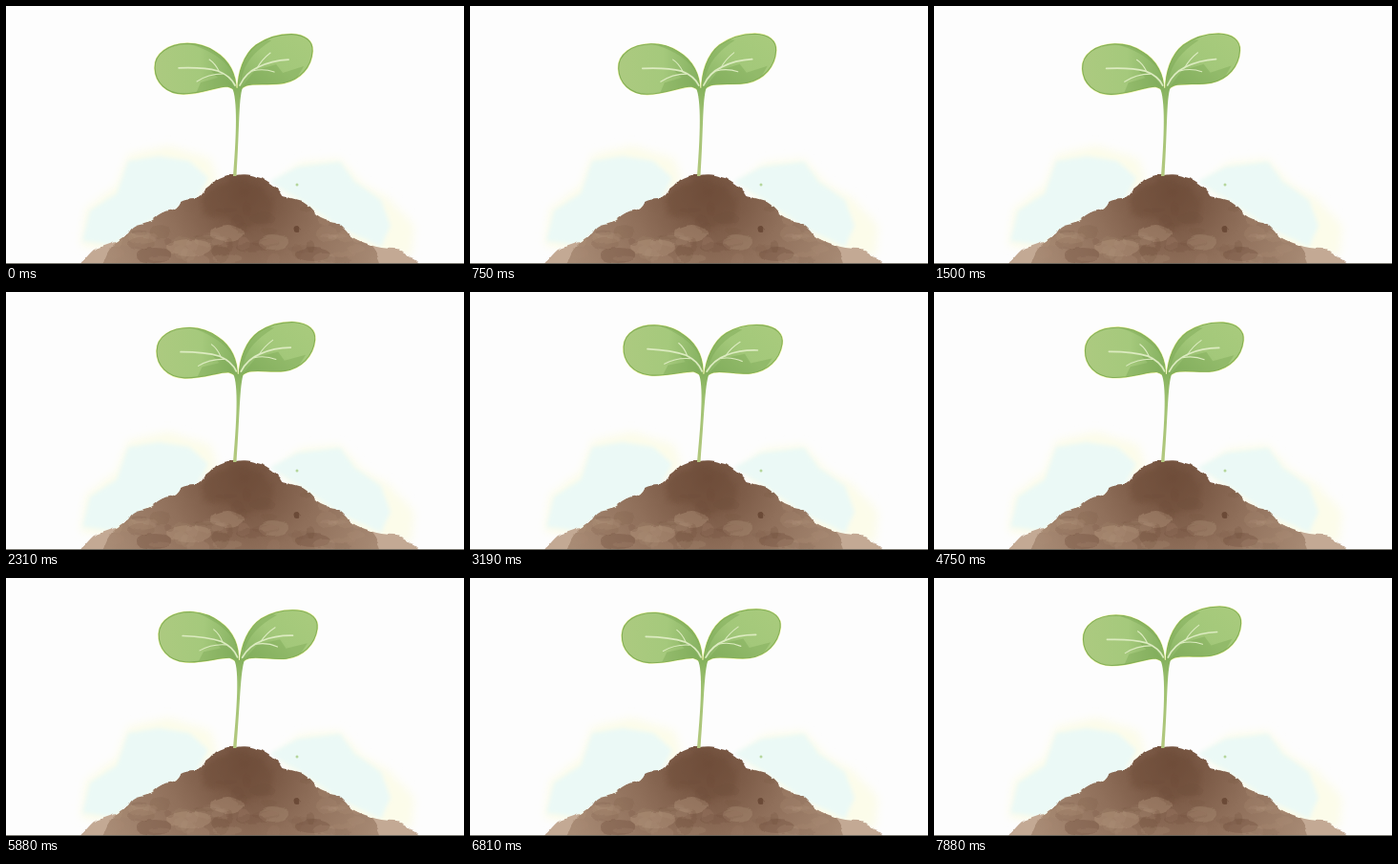
An HTML page that plays this animation: 480x270 px, repeating every 7.95 s.

```html
<!DOCTYPE html>
<html lang="en">
<head>
<meta charset="utf-8">
<title>Swaying sprout</title>
<style>
  html, body { margin: 0; width: 100%; height: 100%; overflow: hidden; background: #fdfdfd; }
  svg { position: absolute; left: 0; top: 0; width: 480px; height: 270px; }
</style>
</head>
<body>
<svg viewBox="0 0 480 270">
  <defs>
    <filter id="rough" x="-5%" y="-5%" width="110%" height="110%" color-interpolation-filters="sRGB">
      <feTurbulence type="fractalNoise" baseFrequency=".08" numOctaves="2" seed="4"/>
      <feDisplacementMap in="SourceGraphic" scale="5" xChannelSelector="R" yChannelSelector="G"/>
    </filter>
    <filter id="soft" x="-20%" y="-20%" width="140%" height="140%"><feGaussianBlur stdDeviation="5"/></filter>
    <filter id="bleed" x="-20%" y="-20%" width="140%" height="140%"><feGaussianBlur stdDeviation="2"/></filter>
    <radialGradient id="earth" gradientUnits="userSpaceOnUse" cx="250" cy="194" r="160">
      <stop offset="0" stop-color="#71503d"/><stop offset=".25" stop-color="#7d5c48"/>
      <stop offset=".5" stop-color="#8f6f5a"/><stop offset="1" stop-color="#a88b75"/>
    </radialGradient>
    <clipPath id="inSoil"><path id="mound" d="M100 276Q105 256 113 250Q120 243 128 238Q133 229 141 228Q149 227 154 223Q164 214 172 214Q180 212 183 205Q188 202 197 202Q205 199 208 192Q214 188 219 182Q228 176 241 177Q254 175 262 179Q271 181 275 184Q284 188 290 199Q300 201 310 204Q318 209 326 219Q334 225 345 226Q354 231 360 240Q370 247 382 250Q390 258 394 276Z"/></clipPath>
  </defs>
  <!-- pale washes behind the mound -->
  <path filter="url(#soft)" fill="#fcfcea" d="M78 250L84 212 116 188 128 156 170 146 215 160 222 185 120 260ZM282 186L308 164 350 160 372 185 402 202 428 230 425 262 370 262Z"/>
  <path filter="url(#bleed)" fill="#ebf9f6" d="M80 246L88 214 116 196 128 162 160 157 192 162 212 180 200 202 150 226 112 250ZM276 184L306 168 350 163 366 184 393 203 403 230 393 252 350 232 310 204Z"/>
  <circle cx="305" cy="187" r="1.5" fill="#b5d69c"/>
  <!-- soil -->
  <g filter="url(#rough)">
    <path fill="#c3a994" d="M74 276Q84 262 92 255Q100 252 109 249L140 238 350 238 382 250Q392 254 408 254Q418 257 424 263Q432 264 436 276Z"/>
    <use href="#mound" fill="url(#earth)"/>
    <g clip-path="url(#inSoil)">
      <path filter="url(#bleed)" fill="#6a4935" opacity=".35" d="M208 196L240 180 266 188 280 206 276 226 252 232 232 222 205 218Z"/>
      <g id="blots"></g>
    </g>
  </g>
  <path fill="#5f5d55" opacity=".85" d="M0 269H480V270H0Z"/>
</svg>

<svg viewBox="0 0 480 270">
  <defs>
    <linearGradient id="leafL"><stop offset="0" stop-color="#acca80"/><stop offset=".55" stop-color="#a5c97c"/><stop offset="1" stop-color="#85b160"/></linearGradient>
    <linearGradient id="leafR" x1="0" y1="1" x2="1" y2="0"><stop offset="0" stop-color="#85b160"/><stop offset=".5" stop-color="#a3c87a"/><stop offset="1" stop-color="#a9cb7d"/></linearGradient>
    <linearGradient id="stalk" x1="0" y1="0" x2="0" y2="1"><stop offset="0" stop-color="#83b05c"/><stop offset=".35" stop-color="#a0c272"/><stop offset="1" stop-color="#b4c980"/></linearGradient>
    <clipPath id="inLeaves">
      <path id="left" d="M241 88C241 72 234 57 219 48C210 42 200 39.5 190 39.5C170 40 155.5 50 156 65C156.500 80 168 92 186 92C204 92 222 84 232 84C236 85 239 87 241 88Z"/>
      <path id="right" d="M243 88C243 70 249 51 262 41C272 34 286 29.500 299 29.500C314 30 321.500 37 321 47C320 64 308 77 291 80.500C278 83 261 80 252 83C247 85 245 88 243 88Z"/>
    </clipPath>
  </defs>
  <g id="leaves">
    <g stroke="#f0f4a8" stroke-width="2.200"><use href="#left"/><use href="#right"/></g>
    <use href="#left" fill="url(#leafL)"/><use href="#right" fill="url(#leafR)"/>
    <g clip-path="url(#inLeaves)">
      <g fill="#79a653" opacity=".4">
        <path d="M241 88L229 70 214 67 222 75 204 80 198 94 225 96ZM246 87L260 68 283 61 290 70 312 63 300 84 270 88Z"/>
        <path d="M240 76C233 56 211 44 185 38L211 37 238 55ZM246 78C250 59 260 48 278 36L260 34 244 57Z"/>
      </g>
    </g>
    <g fill="none" stroke="#83af57" stroke-width="1.100"><use href="#left"/><use href="#right"/></g>
    <g fill="none" stroke="#dcebc0" stroke-linecap="round">
      <path stroke-width="1.700" d="M240 83Q235 73 222 68Q207 64 181 65M245 83Q251 70 264 64Q278 57 296 56"/>
      <path stroke-width="1.100" d="M223 68Q219 60 213 56M227 71Q212 71 200 79M263 65Q268 56 277 49M258 68Q270 65 281 69"/>
    </g>
  </g>
  <path id="stem" fill="url(#stalk)"/>
</svg>

<script>
const LOOP = 7950;
const $ = id => document.getElementById(id);

// Watercolour blots on the soil
let seed = 11;
const rand = (a, b) => {
  seed = seed * 16807 % 2147483647;
  return a + (b - a) * seed / 2147483647;
};
const blot = (x, y, rx, ry, fill, opacity) =>
  `<ellipse cx="${x}" cy="${y}" rx="${rx}" ry="${ry}" fill="${fill}" opacity="${opacity}"/>`;
const LIGHT = '#b4977e', DARK = '#6d4c39';
let blots = blot(232, 238, 18, 9, LIGHT, .4) + blot(192, 253, 24, 9, LIGHT, .4)
  + blot(280, 247, 15, 8, LIGHT, .3) + blot(155, 261, 18, 8, DARK, .35)
  + blot(225, 259, 9, 9, DARK, .3) + blot(322, 260, 18, 8, DARK, .35)
  + blot(305, 233, 3.5, 3, '#5f3e2c', .7);
for (let i = 0; i < 60; i++) {
  const light = i % 2;
  blots += blot(rand(110, 390), rand(light ? 225 : 195, 268), rand(3, 16), rand(2, 8),
    light ? LIGHT : DARK, rand(.08, .24));
}
$('blots').innerHTML = blots;

// Sway amount over time, joined by a smooth monotone curve
const keys = [[0, .1], [1500, -.5], [3190, 6], [4750, 3], [5880, 5], [6810, 4], [7880, .6], [LOOP, .1]];
const key = i => {
  const n = keys.length - 1, turn = Math.floor(i / n), [t, v] = keys[i - turn * n];
  return [t + turn * LOOP, v];
};
const rise = i => {
  const [t0, v0] = key(i), [t1, v1] = key(i + 1);
  return (v1 - v0) / (t1 - t0);
};
const slope = i => {
  const a = rise(i - 1), b = rise(i);
  return a * b > 0 ? 2 * a * b / (a + b) : 0;
};
function sway(t) {
  let i = 0;
  while (key(i + 1)[0] <= t) i++;
  const [t0, v0] = key(i), [t1, v1] = key(i + 1), h = t1 - t0, u = (t - t0) / h, w = 1 - u;
  return w * w * (1 + 2 * u) * v0 + u * u * (3 - 2 * u) * v1
    + h * u * w * (w * slope(i) - u * slope(i + 1));
}

function draw(now) {
  const s = sway(now % LOOP), top = 242 + s * .45, mid = 242 + s * .15;
  $('leaves').setAttribute('transform', `translate(${s * .45}) rotate(${s * .86} 242 88)`);
  $('stem').setAttribute('d', `M${top - 6} 84C${top} 92 ${mid + .5} 125 238 178L241.5 178`
    + `C${mid + 3} 125 ${top + 1.5} 92 ${top + 7} 83L${top + .5} 86Z`);
  requestAnimationFrame(draw);
}
draw(0);
</script>
</body>
</html>
```
